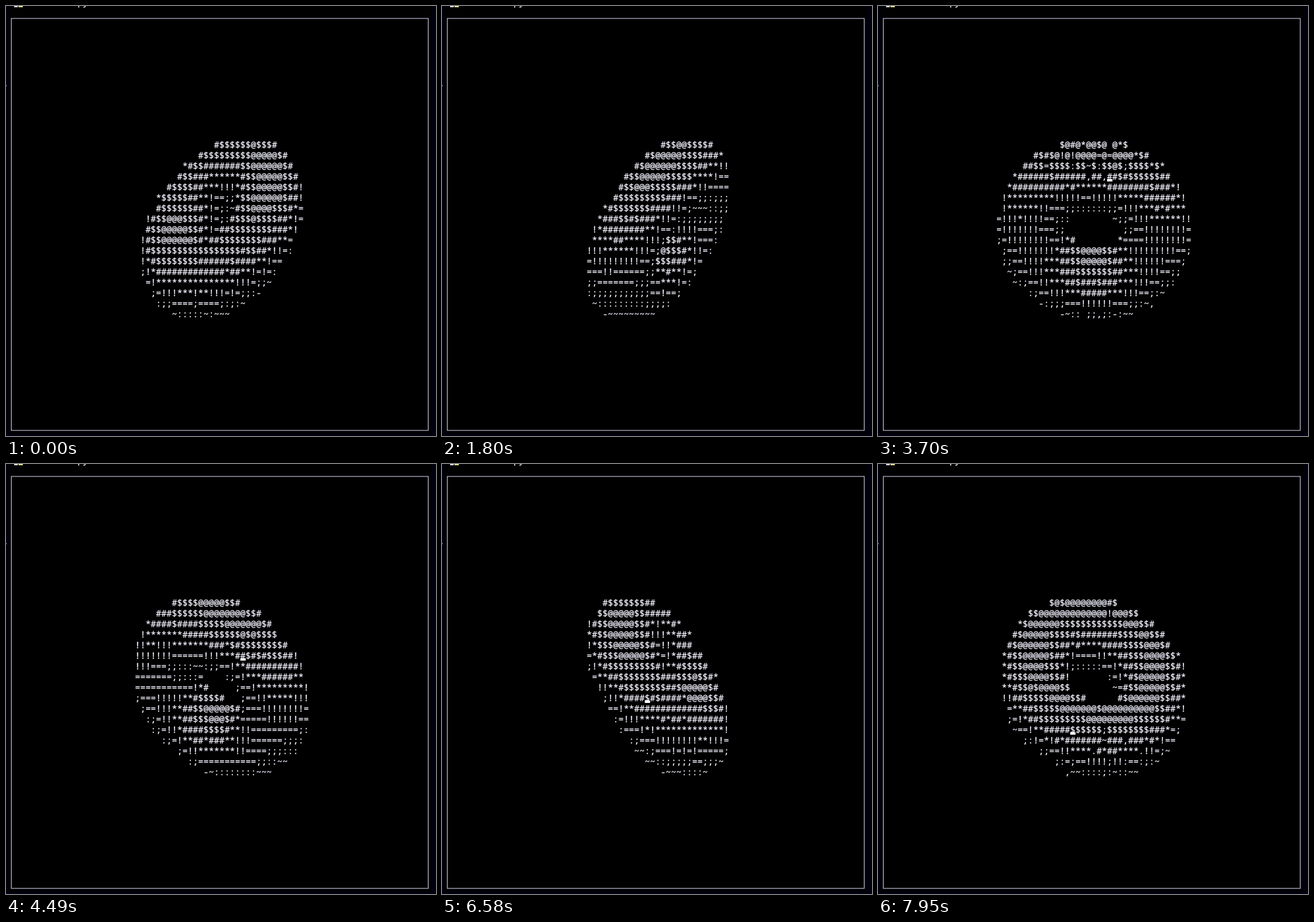
Recreate the animation shown at these times as an HTML page. Size 691 by 691 pixels, loop 8000 ms.

```html
<!DOCTYPE html>
<html lang="en">
<head>
<meta charset="utf-8">
<title>ASCII torus</title>
<style>
  html, body { margin: 0; width: 100%; height: 100%; overflow: hidden; background: #000; }
  svg { display: block; width: 100vw; height: 100vh; }
  text {
    font: 500 14.12px "Noto Sans Mono", "DejaVu Sans Mono", monospace;
    fill: #fff; stroke: #e0e0ff; stroke-width: 0.25;
    white-space: pre; text-rendering: geometricPrecision;
  }
</style>
</head>
<body>
<svg viewBox="0 0 691 691">
  <rect width="691" height="691" fill="#000"/>
  <g fill="#00000e">
    <rect width="4" height="691"/>
    <rect x="683" width="8" height="691"/>
    <rect y="687" width="691" height="4"/>
  </g>
  <rect x="13" width="6" height="2" fill="#dcdcf4"/>
  <rect x="20" width="7" height="2" fill="#e6e29a"/>
  <text x="115" y="-1">py</text>
  <rect y="127" width="1" height="2" fill="#8c8cb0"/>
  <rect x="8.5" y="20" width="670" height="662" fill="none" stroke="#c6c6e6" stroke-width="1.1"/>
  <g id="rows"></g>
  <rect id="cursor" width="8.5" height="4" fill="#fff"/>
</svg>
<script>
const LOOP = 8000, STEP = 67;
const COLS = 37, ROWS = 17, CX = 18, CY = 8;
const X0 = 190.3, Y0 = 228, CELL_W = 8.47, CELL_H = 17;
const SCALE = 5.95; // columns per unit, rows are twice as tall
const SHADES = ".,-~:;=!*#$@";
const TILT = Math.PI / 3, ST = Math.sin(TILT), CT = Math.cos(TILT);
const START = -130, SPEED = 0.0368; // degrees, degrees per ms
// time, column, row
const CURSOR = [[3450, 20, 2], [3700, 21, 3], [5240, 23, 6], [6580, 16, 9], [7950, 14, 12]];

const NS = "http://www.w3.org/2000/svg";
const cursor = document.getElementById("cursor");
const lines = Array.from({ length: ROWS }, (_, i) => {
  const line = document.createElementNS(NS, "text");
  line.setAttribute("x", X0);
  line.setAttribute("y", Y0 + i * CELL_H);
  return document.getElementById("rows").appendChild(line);
});

function shade(ny, nz) {
  const light = (ny - nz) * Math.SQRT1_2;
  return SHADES[Math.max(0, Math.min(11, Math.floor(6 + 5.5 * light)))];
}

// The coarse ring step leaves small gaps that show the far wall.
function torus(spin) {
  const s = Math.sin(spin), c = Math.cos(spin);
  const cells = Array(COLS * ROWS).fill(" ");
  const depth = Array(COLS * ROWS).fill(Infinity);
  for (let ring = 0; ring < 2 * Math.PI; ring += 0.1) {
    const a = Math.cos(ring), b = Math.sin(ring);
    const qx = a * c - b * CT * s, qy = b * ST, qz = -a * s - b * CT * c;
    for (let tube = 0; tube < 2 * Math.PI; tube += 0.05) {
      const u = Math.cos(tube), v = Math.sin(tube);
      const nx = u * qx + v * ST * s;
      const ny = u * qy + v * CT;
      const nz = u * qz + v * ST * c;
      const col = CX + Math.round(SCALE * (2 * qx + nx));
      const row = CY - Math.round(SCALE / 2 * (2 * qy + ny));
      const z = 2 * qz + nz, i = row * COLS + col;
      if (z < depth[i]) {
        depth[i] = z;
        cells[i] = shade(ny, nz);
      }
    }
  }
  return cells;
}

function placeCursor(t) {
  const k = CURSOR.findIndex(p => p[0] > t);
  cursor.setAttribute("visibility", k ? "visible" : "hidden");
  if (!k) return;
  const to = CURSOR[k < 0 ? CURSOR.length - 1 : k];
  const from = k < 0 ? to : CURSOR[k - 1];
  const f = k < 0 ? 0 : (t - from[0]) / (to[0] - from[0]);
  const at = i => Math.round(from[i] + (to[i] - from[i]) * f);
  cursor.setAttribute("x", X0 + at(1) * CELL_W);
  cursor.setAttribute("y", Y0 + at(2) * CELL_H - 1);
}

let shown = -1;
function draw(time) {
  const step = Math.floor((time % LOOP) / STEP);
  if (step === shown) return;
  shown = step;
  const t = step * STEP;
  const cells = torus((START + SPEED * t) * Math.PI / 180);
  lines.forEach((line, i) => {
    line.textContent = cells.slice(i * COLS, (i + 1) * COLS).join("");
  });
  placeCursor(t);
}

const begin = performance.now();
function tick() {
  draw(performance.now() - begin);
  requestAnimationFrame(tick);
}
tick();
</script>
</body>
</html>
```
